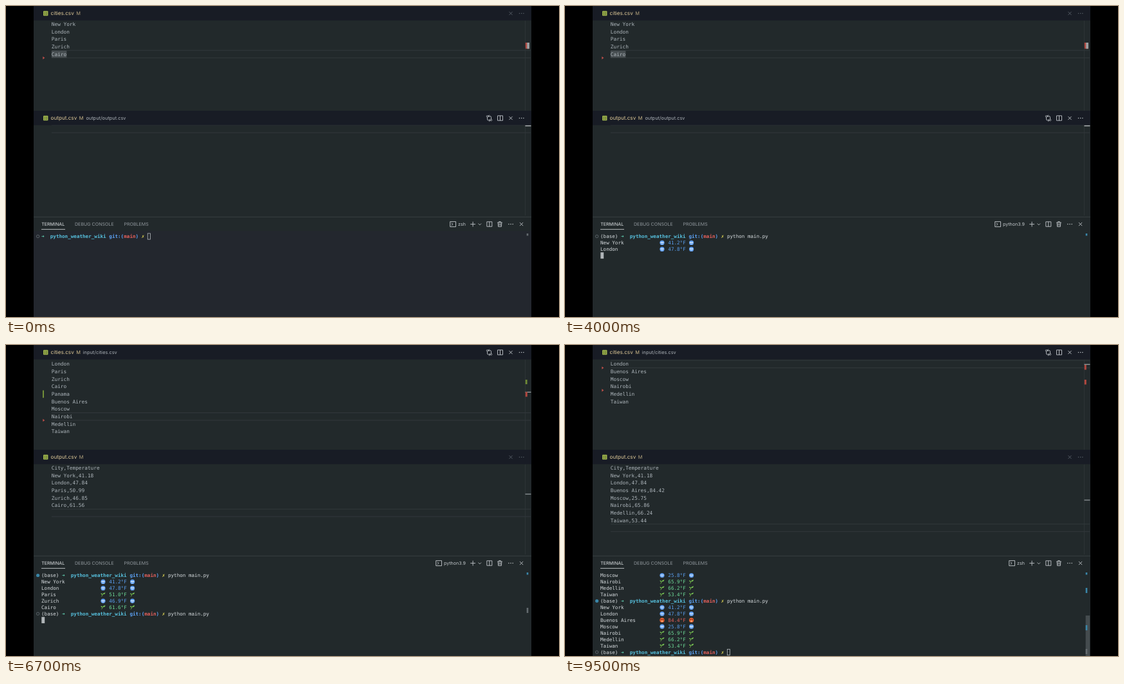
Write an HTML page that moves like this. It is 860x484 px and loops after 9.6 s.

```html
<!DOCTYPE html>
<html lang="en">
<head>
<meta charset="utf-8">
<title>Weather script demo</title>
<style>
html, body { margin: 0; width: 100%; height: 100%; overflow: hidden; background: #000; }
svg { display: block; width: 860px; height: 484px; }
text { white-space: pre; text-rendering: geometricPrecision; }
.ui { font-family: Inter, "Open Sans", sans-serif; }
.mono { font-family: "DejaVu Sans Mono", "Liberation Mono", monospace; }
</style>
</head>
<body>
<svg id="stage" viewBox="0 0 860 484"></svg>
<script>
const LOOP = 9600, STEP = 100;
const ROW = 11.65, TERM_ROW = 9.96, COL = 4.58, TERM_X = 55;
const C = {
  pane: '#22292b', bar: '#181c25', text: '#aeb6bc', term: '#d5dadd', dim: '#596068',
  icon: '#c3c8cc', title: '#dfca98', cyan: '#56bfdc', blue: '#5b9ff0', red: '#e4605c',
  green: '#6edb98', arrow: '#62d4b4', yellow: '#e6dc55', mark: '#3a86a8', warn: '#b0473f'
};
const BASE = ['New York', 'London', 'Paris', 'Zurich', 'Cairo'];
const ADDED = ['Buenos Aires', 'Moscow', 'Nairobi', 'Medellin', 'Taiwan'];
const TEMPS = {
  'New York': 41.18, London: 47.84, Paris: 50.99, Zurich: 46.85, Cairo: 61.56, Panama: 78.24,
  'Buenos Aires': 84.42, Moscow: 25.75, Nairobi: 65.86, Medellin: 66.24, Taiwan: 53.44
};
const RUNS = [
  { type: 3000, ms: 45, enter: 3800, out: 4000, per: 2, cities: BASE, temps: TEMPS },
  { type: 6250, ms: 25, enter: 6700, out: 6900, per: 4, cities: [...BASE, 'Panama', ...ADDED],
    temps: { ...TEMPS, London: 48.04, Paris: 50.95 } },
  { type: 8500, ms: 30, enter: 9000, out: 9100, per: 2, cities: [...BASE.slice(0, 2), ...ADDED], temps: TEMPS }
];
const rule = s => s.padStart(80 + s.length / 2, '=').padEnd(160, '=');
const PYTEST = [
  [rule(' test session starts '), C.term],
  ['platform darwin -- Python 3.9.12, pytest-7.1.1, pluggy-1.0.0', C.term],
  ['collected 4 items', C.term],
  ['', C.term],
  ['tests/test_main.py ....', C.green],
  ['', C.term],
  [rule(' 4 passed in 0.42s '), C.green]
];

// Drawing helpers
const rect = (x, y, w, h, fill, extra = '') =>
  `<rect x="${x}" y="${y}" width="${w}" height="${h}" fill="${fill}" ${extra}/>`;
const path = (d, color, w = 0.9) =>
  `<path d="${d}" fill="none" stroke="${color}" stroke-width="${w}"/>`;
const disc = (x, y, r, fill, extra = '') =>
  `<circle cx="${x}" cy="${y}" r="${r}" fill="${fill}" ${extra}/>`;
const label = (x, y, s, size, fill, cls = 'ui', extra = '') =>
  `<text class="${cls}" x="${x}" y="${y}" font-size="${size}" fill="${fill}" ${extra}>${s}</text>`;
const clip = (id, y, h, body) =>
  `<clipPath id="${id}"><rect x="43" y="${y}" width="774" height="${h}"/></clipPath><g clip-path="url(#${id})">${body}</g>`;

const between = (t, a, b) => t >= a && t < b;
const count = (t, start, ms) => Math.max(0, Math.floor((t - start) / ms));
const typed = (s, t, start, ms) => s.slice(0, count(t, start, ms));
const finish = r => r.out + (Math.ceil(r.cities.length / r.per) - 1) * STEP;

// Icons
const cross = (x, y, c) => path(`M${x - 2.6} ${y - 2.6}l5.2 5.2m0-5.2l-5.2 5.2`, c);
const dots = (x, y, c) => [-3.2, 0, 3.2].map(d => disc(x + d, y, 0.75, c)).join('');
const split = (x, y, c) => path(`M${x - 4} ${y - 3.7}h8v7.4h-8zM${x} ${y - 3.7}v7.4`, c, 0.9);
const compare = (x, y, c) =>
  path(`M${x - 3} ${y - 1.5}v3q0 2 2 2h2.5m-1.6-1.7l1.7 1.7l-1.7 1.7M${x + 3} ${y + 1.8}v-3q0-2-2-2h-2.5m1.6-1.7l-1.7 1.7l1.7 1.7`, c) +
  disc(x - 3, y - 2.8, 1.2, 'none', `stroke="${c}" stroke-width=".8"`) +
  disc(x + 3, y + 3, 1.2, 'none', `stroke="${c}" stroke-width=".8"`);
const trash = (x, y, c) =>
  path(`M${x - 3.8} ${y - 2.5}h7.6M${x - 1.3} ${y - 2.7}v-1.2h2.6v1.2M${x - 2.8} ${y - 2.5}l.4 6.4h4.8l.4-6.4M${x - 1} ${y - 1}v3.4m2-3.4v3.4`, c);
const sheet = y => rect(58, y - 3.7, 7.4, 7.4, '#a0b64e', 'rx=".8"') +
  path(`M59.5 ${y - 1.6}h1.7m1 0h1.7M59.5 ${y + 0.2}h1.7m1 0h1.7M59.5 ${y + 2}h1.7m1 0h1.7`, '#39441f', 0.8);

function face(x, y, temp) {
  if (temp < 50)
    return disc(x, y, 3.6, '#5c9bee') + rect(x - 2.7, y - 1.1, 5.4, 1.4, '#d9ebff', 'rx=".6"') +
      rect(x - 1.5, y + 1.3, 3, 0.9, '#c9e1fb');
  if (temp < 70)
    return path(`M${x - 2.6} ${y + 3}q1.6-1.1 1.9-3.6`, '#7cc04c', 0.9) +
      `<path d="M${x - 0.7} ${y - 0.4}q1-3 4.3-2.5q-.8 3.2-4.3 2.5zM${x - 0.8} ${y}q-2.6.3-2.8-1.9q2.5-.4 2.8 1.9z" fill="#7ccb55"/>`;
  return disc(x, y, 3.6, '#e5602f') + rect(x - 2.3, y - 1.4, 1.6, 1.1, '#5a2015') +
    rect(x + 0.7, y - 1.4, 1.6, 1.1, '#5a2015') + rect(x - 1.2, y + 0.9, 2.4, 1.4, '#ffd0a0', 'rx=".6"');
}

// Editors
function header(top, file, change, dir, active, dirty) {
  const y = top + 11.5, c = active ? C.icon : C.dim;
  let s = rect(43, top, 774, 22.5, C.bar) + sheet(y) +
    label(69.6, y + 2.9, file, 8.15, C.title) + label(change, y + 2.8, 'M', 7.4, active ? '#d2bd8c' : '#b7a67f');
  if (active)
    s += label(change + 10.6, y + 2.8, dir + file, 7.4, '#a9afb5') + compare(751.5, y, c) + split(768.5, y, c);
  return s + (dirty ? disc(785, y, 2.6, c) : cross(785, y, c)) + dots(801.7, y, c);
}

function editor(top, lines, cur, scroll, o = {}) {
  const rowY = i => top + ROW * i - scroll;
  let s = path(`M71 ${rowY(cur)}H816M71 ${rowY(cur + 1)}H816`, '#363d40', 0.8) + (o.behind || '');
  lines.forEach((line, i) => s += label(70.8, rowY(i) + 8.5, line, 7.77, C.text, 'mono'));
  for (const i of o.gaps || [])
    s += `<path d="M57.3 ${rowY(i) - 2.2}l3 2.2l-3 2.2z" fill="#c2504a"/>`;
  if (o.added) s += rect(57.2, rowY(o.added), 1.6, ROW, '#87a83c');
  if (o.caret) s += rect(71 + lines[cur].length * 4.68, rowY(cur) + 0.6, 0.9, 10.5, '#d5d9dc');
  return s + path(`M807.5 ${top}V${top + 140.5}`, '#30373a', 0.8) + (o.ruler || '');
}

function cities(t) {
  if (t >= 8200) return RUNS[2].cities;
  if (t < 4500) return BASE;
  return [...BASE, typed('Panama', t, 4440, 60), ...ADDED.slice(0, count(t, 5200, 100))];
}

function inputPane(t) {
  const lines = cities(t), o = {};
  const scroll = t < 5800 ? 0 : 10.2;
  let cur, ruler;
  const slider = (y, h) => rect(807.5, y, 9, h, '#454c4f');
  const line = y => rect(807.5, y, 9, 1.2, '#a3a8aa');
  const warn = y => rect(807.8, y, 3, 7.5, C.warn);
  if (t < 4500) {
    cur = 4; o.gaps = [5];
    ruler = warn(57) + rect(808, 57, 5.8, 9.5, C.warn) + rect(810.2, 57, 3.8, 9.5, '#9b9fa1');
    o.behind = rect(70.8, 69.6, 23.6, 10.8, '#474e51');
  } else if (t < 5800) {
    cur = lines.length - 1; o.gaps = [5, cur + 1]; o.caret = true;
    ruler = slider(23, 99) + rect(807.8, 55, 3, 17, '#8a4b48') + line(62.8);
  } else if (t < 8200) {
    cur = t < 7200 ? 8 : 5; o.gaps = [9]; o.added = 5;
    o.caret = t < 6100 || t >= 7200;
    ruler = (between(t, 7600, 8200) ? slider(28, 77) : '') + line(cur === 8 ? 72.8 : 53.8) +
      (cur === 8 ? rect(807.8, 54, 2.8, 7, '#6f8a35') : '') + warn(73);
    if (t >= 7900) {
      const first = Math.max(2, 5 - count(t, 7800, 100));
      for (let i = first; i <= 5; i++)
        o.behind = (o.behind || '') + rect(70.8, 22.5 + i * ROW - scroll, lines[i].length * 4.68, ROW, '#3d4855');
    }
  } else {
    cur = 1; o.gaps = [2, 5]; o.caret = t < 8400;
    ruler = line(29.6) + warn(31) + warn(54);
  }
  o.ruler = ruler;
  const dirty = between(t, 4500, 6000) || between(t, 8200, 8300);
  let s = clip('in', 22, 141, editor(22.5, lines, cur, scroll, o)) +
    header(0, 'cities.csv', 109.2, 'input/', t >= 4400, dirty);
  if (between(t, 4700, 5000))
    s += rect(99.3, 92.7, 278, 13, '#1d2326', 'stroke="#868c8f" stroke-width=".9"') +
      label(101, 101, 'abc', 5.6, C.icon) + label(113.2, 101.7, 'Panama', 7.77, '#5aa8ec', 'mono', 'font-weight="bold"');
  return s;
}

function outputPane(t) {
  const n = RUNS.filter(r => t >= finish(r) + (r === RUNS[0] ? 100 : 0)).length;
  const run = RUNS[n - 1];
  const lines = run ? ['City,Temperature', ...run.cities.map(c => `${c},${run.temps[c].toFixed(2)}`)] : [];
  const ruler = rect(807.5, [185.6, 231.3, 255.5, 240.6][n], 9, 1.6, n ? '#7c8285' : '#b4b8ba');
  return clip('out', 185, 143, editor(185.5, lines, lines.length, 0, { ruler })) +
    header(163, 'output.csv', 113.8, 'output/', t < 4400, false);
}

// Terminal
function session(t) {
  const lines = [];
  let running = false, program = 'zsh';
  const prompt = (cmd, done, env = '(base) ') => lines.push({ env, cmd, done });
  if (t < 2800) {
    prompt(typed('conda activate', t, 160, 40), t >= 900, '');
    running = between(t, 800, 900);
    if (t >= 900) prompt('', false);
    if (t >= 1500) prompt(t < 1900 ? typed('pytest', t, 1500, 60) : 'pytest', t >= 2300);
    if (t >= 1900) {
      running = t < 2300;
      if (running && t >= 2000) program = 'python3.9';
      PYTEST.slice(0, count(t, 1900, 100) * 2).forEach(([text, color]) => lines.push({ text, color }));
      if (!running) prompt(typed('clear', t, 2420, 40), false);
    }
    return { lines, running, program };
  }
  prompt('', false);
  for (const r of RUNS) {
    const last = lines[lines.length - 1];
    last.cmd = t < r.enter ? typed('python main.py', t, r.type, r.ms) : 'python main.py';
    if (t < r.enter) break;
    const shown = count(t, r.out - STEP, STEP) * r.per;
    r.cities.slice(0, shown).forEach(city => lines.push({ city, temp: r.temps[city] }));
    running = t < finish(r);
    if (running) { program = 'python3.9'; break; }
    last.done = true;
    prompt('', false);
  }
  return { lines, running, program };
}

const promptLength = l => l.env.length + 36 + l.cmd.length;

function termRow(l, i) {
  const mid = 358.5 + i * TERM_ROW;
  const put = (col, s, color, bold) =>
    label(TERM_X + col * COL, mid + 2.7, s, 7.6, color, 'mono', bold ? 'font-weight="bold"' : '');
  if (l.text !== undefined) return put(0, l.text, l.color);
  if (l.city) {
    const color = l.temp < 50 ? C.blue : l.temp < 70 ? C.green : C.red;
    return put(0, l.city, C.term) + face(151, mid, l.temp) +
      put(23, l.temp.toFixed(1) + '°F', color) + face(196.6, mid, l.temp);
  }
  const c = l.env.length;
  const dot = l.done ? disc(49.6, mid, 2.6, C.mark) : disc(49.6, mid, 2.2, 'none', 'stroke="#687076" stroke-width=".8"');
  return dot + put(0, l.env, C.term) + put(c, '➜', C.arrow, true) +
    put(c + 3, 'python_weather_wiki', C.cyan, true) + put(c + 23, 'git:(', C.blue, true) +
    put(c + 28, 'main', C.red, true) + put(c + 32, ')', C.blue, true) +
    put(c + 34, '✗', C.yellow, true) + put(c + 36, l.cmd, C.term);
}

function scrollMarks(t) {
  const mark = (y, h, c) => rect(809.7, y, 2.6, h, c);
  const grey = '#646b6f';
  if (t < 900 || between(t, 2800, 3800)) return mark(354, 3.5, grey);
  if (t < 2800) return mark(354, 23.5, grey);
  const s = mark(354, 3.5, C.mark);
  if (t < 7100) return s + (t < 4200 ? '' : mark(409, 8, grey));
  if (t < 9400) return s + mark(390.5, 8, C.mark) + mark(472, 8, grey);
  return rect(809.7, 421, 6.5, 63, '#454c4f') + s + mark(378, 8, C.mark) + mark(436, 8, C.mark) + mark(473, 8, grey);
}

function terminal(t) {
  const { lines, running, program } = session(t);
  const shown = (running ? [...lines, { text: '' }] : lines).slice(-13);
  const end = shown[shown.length - 1];
  const x = TERM_X + (running ? 0 : promptLength(end) * COL);
  const y = 353.5 + (shown.length - 1) * TERM_ROW;
  const focused = between(t, 200, 4400) || between(t, 6100, 7200) || between(t, 8400, 9400);
  const cursor = focused ? rect(x + 0.3, y, 4.9, 9.8, '#b0b5b8')
    : rect(x + 0.4, y + 0.4, 4.2, 9.2, 'none', 'stroke="#b4b9bc" stroke-width=".8"');
  const px = program === 'zsh' ? 703 : 681, c = C.icon;
  return rect(43, 328, 774, 156, C.pane) + (t < 1500 ? rect(43, 350, 774, 134, '#23272e') : '') +
    path('M43 328.3H817', '#3a4145', 0.9) +
    label(55.2, 342.3, 'TERMINAL', 7.1, '#dfe3e5') + path('M55 347.6H92', '#c9cdd0', 0.9) +
    label(107, 342.3, 'DEBUG CONSOLE', 7.1, '#8f969b') + label(183.4, 342.3, 'PROBLEMS', 7.1, '#8f969b') +
    path(`M${px - 12.3} 335.6h8.8v8h-8.8zM${px - 10.2} 337.6l2.2 2l-2.2 2`, c) +
    label(px, 342.2, program, 7.1, c) +
    path('M722.2 339.6h7.8M726.1 335.7v7.8M734.6 338.6l2.2 2.2l2.2-2.2', c) +
    split(751.8, 339.5, c) + trash(768, 339.5, c) + dots(785, 339.5, c) + cross(801.6, 339.5, c) +
    clip('term', 350, 134, shown.map(termRow).join('') + cursor + scrollMarks(t));
}

const stage = document.getElementById('stage');
let shownAt = -1;

function render(t) {
  stage.innerHTML = rect(0, 0, 860, 484, '#000') + rect(43, 0, 774, 484, C.pane) +
    inputPane(t) + outputPane(t) + terminal(t);
}

function tick() {
  const t = Math.floor(performance.now() % LOOP / STEP) * STEP;
  if (t !== shownAt) render(shownAt = t);
  requestAnimationFrame(tick);
}
tick();
</script>
</body>
</html>
```
